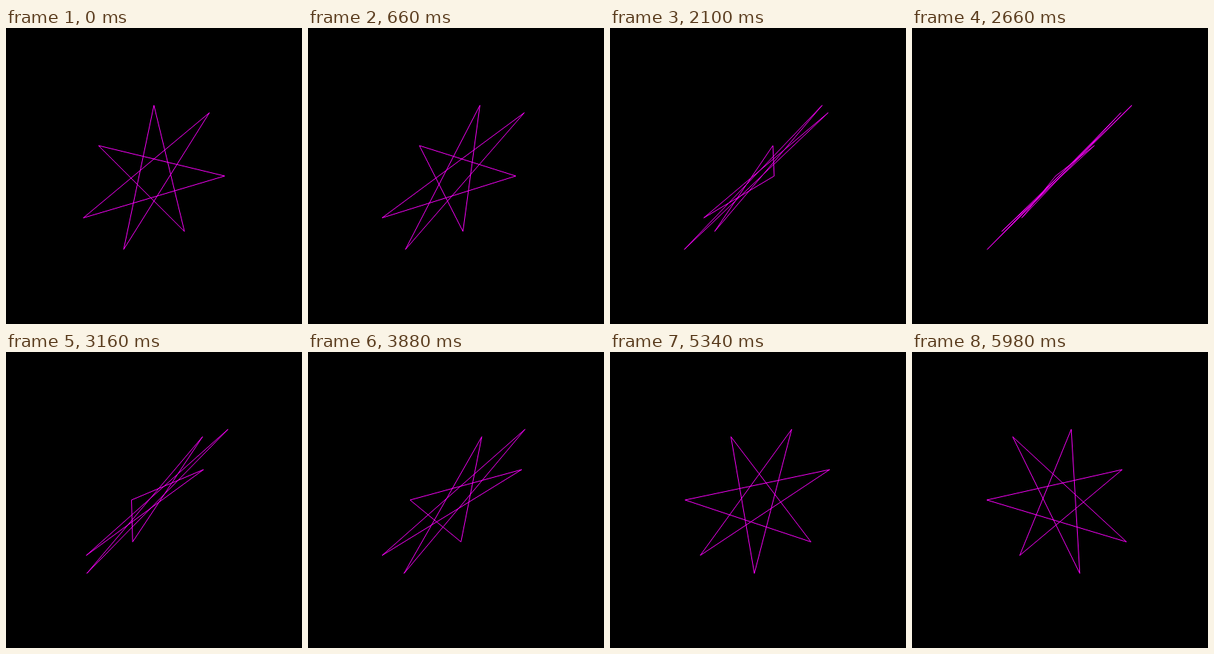
An HTML page with a canvas for the animation above (6000 ms loop, 400 px wide and 400 px high).

```html
<!DOCTYPE html>
<html lang="en">
<head>
<meta charset="utf-8">
<title>Turning star</title>
<style>
  html, body {
    margin: 0;
    width: 100%;
    height: 100%;
    overflow: hidden;
    background: #000;
  }
  canvas { display: block; }
</style>
</head>
<body>
<canvas id="stage" width="400" height="400"></canvas>
<script>
  const ctx = document.getElementById('stage').getContext('2d');
  const LOOP = 6000;
  const STEP = 20;
  const CENTER = 200;
  const RADIUS = 100;
  const POINTS = 7;

  ctx.strokeStyle = '#f0f';
  ctx.lineWidth = 1;
  ctx.lineJoin = 'bevel';

  // Heights stay fixed; only the horizontal phase turns.
  function draw(time) {
    const tick = Math.floor((time % LOOP) / STEP);
    const phase = 0.3 + tick * 0.01;

    ctx.fillStyle = '#000';
    ctx.fillRect(0, 0, 400, 400);
    ctx.beginPath();
    for (let i = 0; i < POINTS; i++) {
      const angle = i * Math.E;
      ctx.lineTo(
        CENTER + RADIUS * Math.cos(angle - phase),
        CENTER - RADIUS * Math.sin(angle)
      );
    }
    ctx.closePath();
    ctx.stroke();
  }

  const start = performance.now();

  function loop() {
    draw(performance.now() - start);
    requestAnimationFrame(loop);
  }

  loop();
</script>
</body>
</html>
```
